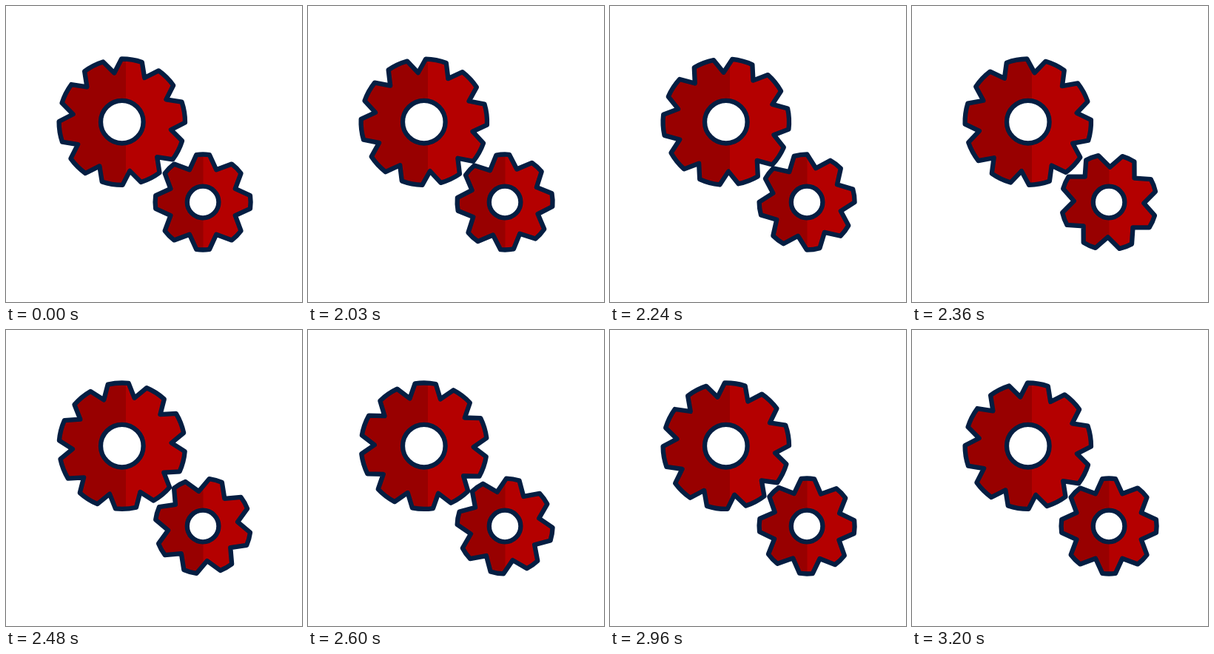
Write an HTML page with a canvas that moves like this. It is 400 by 400 pixels and loops after 3290 ms.

```html
<!DOCTYPE html>
<html lang="en">
<head>
<meta charset="utf-8">
<title>Gears</title>
<style>
  html, body { margin: 0; width: 100%; height: 100%; overflow: hidden; background: #fff; }
  canvas { display: block; width: 400px; height: 400px; }
</style>
</head>
<body>
<canvas id="stage" width="400" height="400"></canvas>
<script>
const ctx = document.getElementById('stage').getContext('2d');
const LOOP = 3290, START = 2000, DURATION = 1165, STEP = 30;
const NAVY = '#041e42', DARK = '#980000', LIGHT = '#b40000';
const RAD = Math.PI / 180;

const big = { x: 156.8, y: 156.7, teeth: 10, tip: 85.2, valley: 67, half: 9.5, hole: 28.8, split: 162, phase: 9, turn: 72 };
const small = { x: 266.1, y: 265, teeth: 8, tip: 64.5, valley: 47.3, half: 7.9, hole: 21.3, split: 266.5, phase: 0, turn: -90 };

// Cubic Bezier easing with control points (0.1, 0) and (0, 1).
function ease(x) {
  if (x <= 0) return 0;
  if (x >= 1) return 1;
  let lo = 0, hi = 1;
  for (let i = 0; i < 30; i++) {
    const s = (lo + hi) / 2;
    if (0.3 * s * (1 - s) ** 2 + s ** 3 < x) lo = s; else hi = s;
  }
  return lo * lo * (3 - 2 * lo);
}

function gearPath(g, angle) {
  const path = new Path2D();
  const pitch = 360 / g.teeth;
  for (let i = 0; i < g.teeth; i++) {
    const mid = angle + i * pitch - 90;
    const gap = (mid + pitch / 2) * RAD;
    path.arc(g.x, g.y, g.tip, (mid - g.half) * RAD, (mid + g.half) * RAD);
    path.lineTo(g.x + g.valley * Math.cos(gap), g.y + g.valley * Math.sin(gap));
  }
  path.closePath();
  path.moveTo(g.x + g.hole, g.y);
  path.arc(g.x, g.y, g.hole, 0, 2 * Math.PI);
  return path;
}

function drawGear(g, progress) {
  const path = gearPath(g, g.phase + g.turn * progress);
  ctx.fillStyle = LIGHT;
  ctx.fill(path, 'evenodd');
  ctx.save();
  ctx.clip(path, 'evenodd');
  ctx.fillStyle = DARK;
  ctx.fillRect(0, 0, g.split, 400);
  ctx.restore();
  ctx.strokeStyle = NAVY;
  ctx.lineWidth = 6.3;
  ctx.lineJoin = 'round';
  ctx.stroke(path);
}

function render(now) {
  const elapsed = now % LOOP - START;
  const progress = ease(Math.floor(elapsed / STEP) * STEP / DURATION);
  ctx.fillStyle = '#fff';
  ctx.fillRect(0, 0, 400, 400);
  drawGear(big, progress);
  drawGear(small, progress);
}

const origin = performance.now();
function tick() {
  render(performance.now() - origin);
  requestAnimationFrame(tick);
}
tick();
</script>
</body>
</html>
```
